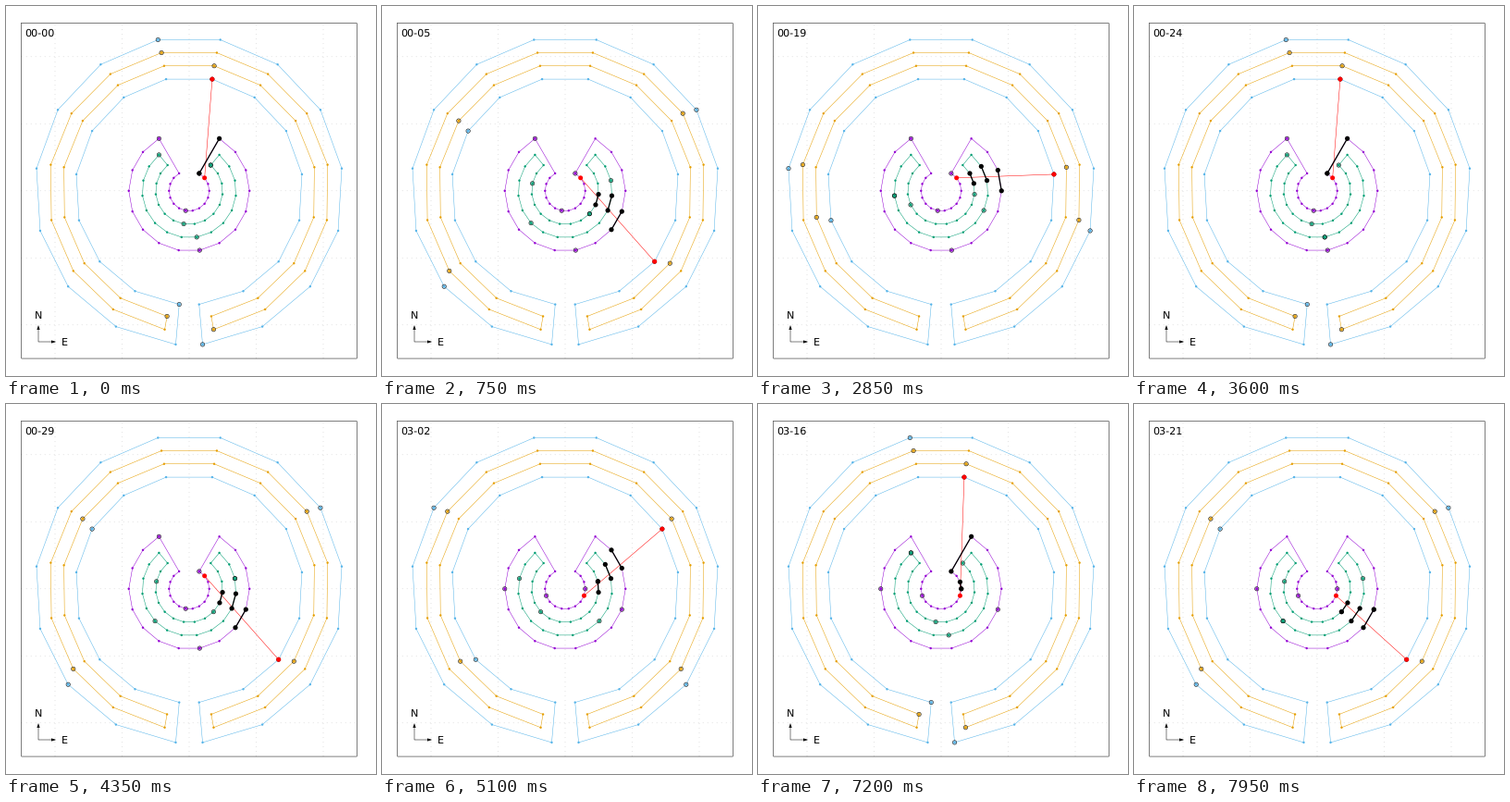
A matplotlib script that plays this animation: 400 px wide and 400 px high, repeating every 8000 ms.

```python
import numpy as np
import matplotlib.pyplot as plt
from matplotlib.animation import FuncAnimation

plt.rcParams["path.snap"] = False
plt.rcParams["text.hinting"] = "none"

PX = 0.72                        # points per pixel at 100 dpi
UNIT, CX, CY = 72.5, 198.0, 199.8
THIN = 0.5 * PX
STEP_FRAMES = 3                  # one step lasts 150 ms
STEPS_PER_START = 32
START_LABELS = (0, 3)


def arc_band(r_out, r_in, first, last):
    """32 corners: 16 along the outer arc, then 16 back along the inner one."""
    a = np.radians(np.linspace(first, last, 16))
    a = np.concatenate([a, a[::-1]])
    r = UNIT * np.repeat([r_out, r_in], 16)
    return np.column_stack([CX + r * np.sin(a), CY - r * np.cos(a)])


purple = arc_band(0.9, 0.3, 30, 330)
green = arc_band(0.7, 0.5, 40, 320)
orange = arc_band(2.1, 1.9, -170, 170)
blue = arc_band(2.3, 1.7, -175, 175)
BANDS = [(purple, "#9400D3"), (green, "#009E73"),
         (blue, "#56B4E9"), (orange, "#E69F00")]


def cross(u, v):
    return u[0] * v[1] - u[1] * v[0]


def crosses(p, q, a, b):
    """True where the open segments pq and ab intersect."""
    eps = 1e-6
    s1, s2 = cross(q - p, a - p), cross(q - p, b - p)
    t1, t2 = cross(b - a, p - a), cross(b - a, q - a)
    return s1 * s2 < -eps and t1 * t2 < -eps


fig = plt.figure(figsize=(4, 4), dpi=100, facecolor="white")
ax = fig.add_axes([0, 0, 1, 1])
ax.set(xlim=(0, 400), ylim=(400, 0))
ax.axis("off")


def dots(size, face, zorder, edge="none", points=((0, 0),)):
    # a list of sizes keeps the positions off the pixel grid
    area = (size * PX) ** 2
    x, y = np.array(points).T
    marks = ax.scatter(x, y, c=face, edgecolors=edge, linewidths=THIN,
                       zorder=zorder)
    marks.set_sizes([area, area])
    return marks


half = 2.5 * UNIT
left, right, top, bottom = CX - half, CX + half, CY - half, CY + half
for k in range(-2, 3):
    style = dict(color="#c8c8c8", lw=THIN, dashes=(2, 8), zorder=0)
    ax.plot([CX + k * UNIT] * 2, [bottom, top], **style)
    ax.plot([left, right], [CY + k * UNIT] * 2, **style)
ax.plot([left, right, right, left, left], [top, top, bottom, bottom, top],
        color="black", lw=THIN, zorder=1)

for points, color in BANDS:
    loop = np.vstack([points, points[:1]])
    ax.plot(*loop.T, color=color, lw=THIN, zorder=2)
    dots(2.4, color, 2, points=points)

# compass
ax.plot([35, 35, 53], [347, 363, 363], color="black", lw=THIN)
ax.fill([35, 33.4, 36.6], [345, 350, 350], color="black", lw=0)
ax.fill([54, 49, 49], [363, 361.4, 364.6], color="black", lw=0)
font = dict(family="DejaVu Sans", fontsize=8, color="black", va="baseline")
ax.text(35, 338, "N", ha="center", **font)
ax.text(63.7, 367.3, "E", ha="center", **font)
label = ax.text(20, 33.3, "", **font)


def ring(color):
    return dots(4.4, color + "80", 3, edge="black")


rings = [ring(color) for _, color in BANDS]
active = ring("#009E73")
ray, = ax.plot([], [], color="red", lw=THIN, zorder=4)
hits, = ax.plot([], [], color="black", lw=1.3 * PX, zorder=5)
hit_dots = dots(5.2, "black", 5)
ends = dots(5, "red", 6)


def draw(frame):
    block, step = divmod(frame // STEP_FRAMES, STEPS_PER_START)
    start = START_LABELS[block]
    label.set_text(f"{start:02d}-{step:02d}")

    # every eighth corner is marked, stepping backwards
    phase = (7 - step) % 8
    for (points, _), marks in zip(BANDS, rings):
        first = (7 - start) % 8 if points is purple else phase
        marks.set_offsets(points[first::8])
    active.set_offsets(green[[31 - step]])

    p, q = purple[30 - start], blue[16 + phase]
    ray.set_data(*np.array([p, q]).T)
    ends.set_offsets([p, q])

    path, corners = [], []
    for points in (purple, green):
        for a, b in zip(points, np.roll(points, -1, axis=0)):
            if crosses(p, q, a, b):
                path += [a, b, (np.nan, np.nan)]
                corners += [a, b]
    hits.set_data(*np.array(path).reshape(-1, 2).T)
    hit_dots.set_offsets(np.array(corners).reshape(-1, 2))
    return [label, *rings, active, ray, hits, hit_dots, ends]


anim = FuncAnimation(fig, draw, frames=160, interval=50, repeat=True,
                     repeat_delay=0, blit=False)
plt.show()
```
